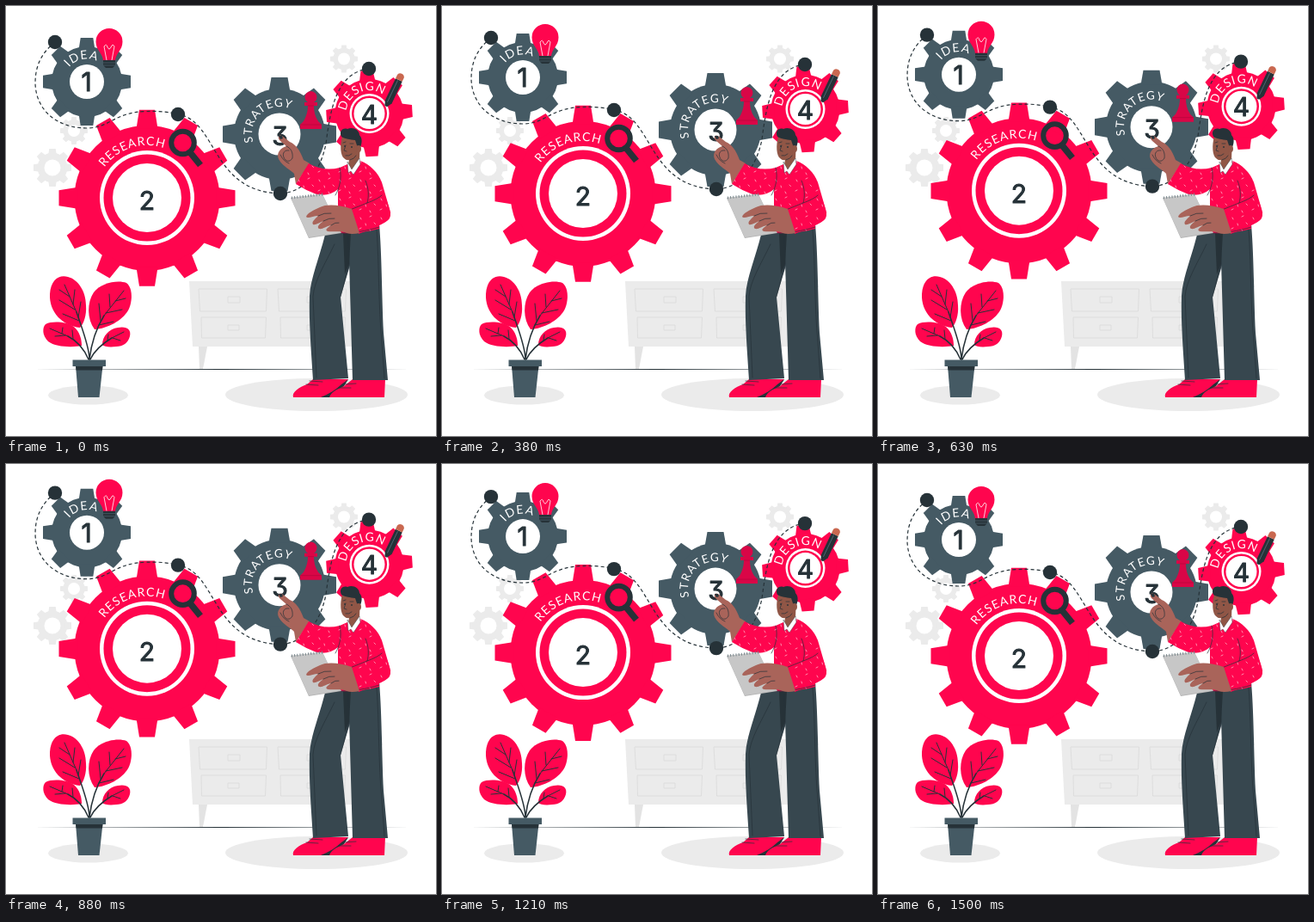
An HTML page that plays this animation: 500x500 px, repeating every 1540 ms.

```html
<!DOCTYPE html>
<html lang="en">
<head>
<meta charset="utf-8">
<title>Gears</title>
<style>
  html, body { margin: 0; width: 100%; height: 100%; overflow: hidden; background: #fff; }
  svg { display: block; width: 100vw; height: 100vh; }
  .red { fill: #ff054e; }
  .slate { fill: #455a64; }
  .dark { fill: #263238; }
  .pale { fill: #ebebeb; }
  .white { fill: #fff; }
  .face { fill: #905646; }
  .hand { fill: #a9645a; }
  .pants { fill: #37474f; }
  .line { fill: none; stroke: #263238; stroke-width: .7; stroke-linecap: round; stroke-linejoin: round; }
  .stem { stroke-width: 1.5; }
  .vein { stroke-width: 1; }
  .route { stroke-width: 1.2; stroke-dasharray: 4 3; stroke-linecap: butt; }
  .label { font: 400 14px Lato, "Open Sans", sans-serif; letter-spacing: 1px; fill: #fff; text-anchor: middle; }
  .digit {
    font: 400 30px Inter, Roboto, sans-serif; font-feature-settings: "cv09";
    fill: #263238; stroke: #263238; stroke-width: 1; stroke-linejoin: round; text-anchor: middle;
  }
</style>
</head>
<body>
<svg viewBox="0 0 500 500">
  <defs>
    <pattern id="flecks" width="24" height="22" patternUnits="userSpaceOnUse">
      <path d="M4 4l1 2M15 3l2-1M10 11l.5 2M20 10l1.500 1.500M3 17l2-1M15 18l1 2"
        fill="none" stroke="#ffb3c8" stroke-width=".8" stroke-linecap="round"/>
    </pattern>
  </defs>

  <!-- room -->
  <path class="dark" d="M32 422.400L250 422L469 422.400L250 422.900Z"/>
  <path d="M224 396H234L229 422H225Z" fill="#e3e3e3"/>
  <path class="pale" d="M213 320H424L420 396H217Z"/>
  <g id="drawers" fill="none" stroke="#dcdcdc" stroke-width=".9"></g>
  <ellipse class="pale" cx="95.500" cy="452.500" rx="46.500" ry="11"/>
  <ellipse class="pale" cx="361" cy="452" rx="106" ry="19"/>
  <g id="backGears"></g>

  <!-- plant -->
  <g class="red">
    <path d="M86 374C66 372 50 356 51 335C52 318 62 312 72 315C84 318 93 332 93 348C94 360 90 370 86 374Z"/>
    <path d="M103 376C94 364 94 345 102 333C110 322 130 318 140 322C148 328 147 345 142 354C135 366 118 375 103 376Z"/>
    <path d="M88 395C78 397 58 397 49 390C42 383 42 374 46 370C54 366 70 367 79 373C86 379 88 388 88 395Z"/>
    <path d="M112 394C112 384 120 375 130 374C140 372 146 376 144 384C142 392 136 396 128 396C120 397 114 396 112 394Z"/>
  </g>
  <path class="line stem" d="M97 411C97 396 88 374 82 356M97 411C99 394 104 376 114 360
    M96 411C90 397 82 389 72 384M98 411C103 400 113 392 123 386"/>
  <path class="line vein" d="M82 356L68 324M78 347L80 330M80 353L62 342M84 362L87 344M85 366L66 358M74 338L62 330
    M114 360L137 331M121 350L120 335M116 357L135 353M110 366L108 346M108 371L125 367M127 343L139 340
    M72 384L51 375M65 381L66 374M69 383L57 384M78 387L77 377M123 386L137 379M118 389L119 382M124 386L133 389"/>
  <path class="slate" d="M81 418H112.500L108.500 455H84Z"/>
  <path class="dark" d="M81 418H112.500L112 423.500H81.600Z"/>
  <path class="slate" d="M77.500 411.500H116V419H77.500Z"/>

  <!-- floating group -->
  <g id="float">
    <g id="gears"></g>
    <path class="line route"
      d="M57 42C38 57 34 74 34 90C35 122 60 142 94 142C121 142 126 123 164 122.500C176 122 190 123 200 126
         C246 133 238 216 319 218C348 217 366 191 372 160C376 130 380 106 393 89C401 79 411 74 422 73"/>
    <g id="dots" class="dark"></g>

    <!-- bulb -->
    <path class="red" d="M113 64C113 55 104.500 52 104.500 41.500A15.500 15.500 0 0 1 135.500 41.500C135.500 52 127 55 127 64Z"/>
    <path d="M117 63L114 47Q117 43 118 48Q120 52 122 48Q124 43 126 47L123 63" fill="none" stroke="#fff" stroke-width=".8"/>
    <path class="dark" d="M113 63H127V69L124 72H116L113 69Z"/>
    <path d="M113 66H127M113 69H127" stroke="#546e7a" stroke-width=".6"/>

    <!-- magnifier -->
    <g fill="none" stroke="#263238">
      <circle cx="205.500" cy="159" r="13.300" stroke-width="6"/>
      <path d="M213 169L226 185" stroke-width="7.500"/>
    </g>

    <!-- pawn -->
    <path fill="#d90647" d="M342 143V138L346 134C350 127 351 121 351 116H347V112H351A7 7 0 1 1 358 112H362V116H358
      C358 122 359 128 363 134L367 138V143Z"/>
    <path d="M351 116H358M342 138H367" stroke="#b3073c" stroke-width=".7"/>

    <!-- pencil -->
    <g transform="translate(459 81.500) rotate(25.500)">
      <path class="dark" d="M-4.300 5H4.300V33L1 39H-2L-4.300 33Z"/>
      <path d="M-1 6V34" stroke="#546e7a" stroke-width=".8"/>
      <path fill="#c96850" d="M-4.300 5V0Q-3 -3 0 -3Q3 -3 4.300 0V5Z"/>
    </g>
  </g>

  <!-- shoes and legs -->
  <path class="red" d="M357 434H398C390 444 385 455 377 455H334C332 449 341 443 350 440Z"/>
  <path class="red" d="M403 434H441L440 455H375C374 449 383 446 393 442Z"/>
  <path class="dark" d="M366 455C376 451 384 446 390 440L398 434L393 442C384 446 378 449 376 455Z"/>
  <path class="line" d="M353 436L368 437M349 440L363 441M391 440L407 439M387 444L401 444"/>
  <path class="pants" d="M386 262L371 266C364 294 354 317 353 337C352 367 355 402 357 435L398 433L389 338L402 295L399 260Z"/>
  <path class="pants" d="M395 260L434 254C437 288 437 337 439 380L444 435H403L399 296Z"/>
  <path class="dark" d="M392 264L401 263L399 300L394 312Z"/>
  <path class="line" d="M398 268L399 300L389 338M431 260C434 300 433 350 437 390L440 433M382 277C371 300 358 320 357 338L361 432"/>

  <!-- raised hand -->
  <path class="hand" d="M353 183L346 179C342 168 337 161 330 158L321 151C317 149 315 153 319 157L326 163
    C319 165 314 171 317 178C322 187 332 191 335 195L337 207Z"/>
  <path class="line" d="M326 163C331 165 334 170 333 177C330 182 325 181 323 176C321 171 324 167 329 168M319 173Q322 180 329 183"/>
  <path class="dark" d="M317 151L321 151L322 154L319 155Z"/>

  <!-- sweater -->
  <g id="sweater"></g>
  <path class="line" d="M388 188C391 200 388 211 383 220M418 203C422 212 422 222 420 229L400 237M420 229C428 226 434 223 437 220M386 264C402 264 419 262 434 257"/>

  <!-- head -->
  <path class="face" d="M391 152C388 162 389 174 393 177Q396 180 399 179L398 184L402 192L411 179L412 153Z"/>
  <path class="dark" d="M390 152C387 146 391 141 397 143C403 140 411 144 411 150C415 154 414 161 411 166L408 162L406 156C400 155 395 155 390 152Z"/>
  <ellipse class="face" cx="410" cy="166" rx="3" ry="4"/>
  <path class="line" d="M392 159L395 158M400 160L404 160M395 162L393 168L396 169M395 174Q399 175 402 172M400 179Q405 178 407 174"/>
  <circle class="dark" cx="394" cy="163" r=".9"/>
  <circle class="dark" cx="402" cy="164" r=".9"/>
  <path class="white" d="M397 181L402 190L411 177L412 184L404 196L401 192L398 194Z" stroke="#263238" stroke-width=".4"/>

  <!-- notepad and holding hand -->
  <path d="M331 223L368 219L390 264L352 270Z" fill="#b5b5b5"/>
  <path d="M331 223L368 219L389 263.500L352 269Z" fill="#c7c7c7"/>
  <path d="M332 223L368 219" stroke="#78868c" stroke-width="3" stroke-dasharray="1 2.200"/>
  <path class="hand" d="M402 236C388 231 373 230 365 234C358 237 350 241 349 245C351 248 357 244 363 244
    C359 248 355 251 357 254C360 255 364 252 369 250C364 254 361 257 364 259C368 260 372 256 378 255
    C374 258 370 260 374 262C380 263 390 261 396 264Q402 266 411 264Z"/>
  <path class="line" d="M363 244Q370 240 378 241M369 250Q376 246 382 247M378 255Q383 251 387 252"/>
</svg>

<script>
const SVG_NS = "http://www.w3.org/2000/svg";
const byId = id => document.getElementById(id);

function add(parent, tag, attrs, text) {
  const node = document.createElementNS(SVG_NS, tag);
  for (const name in attrs) node.setAttribute(name, attrs[name]);
  if (text) node.textContent = text;
  return parent.appendChild(node);
}

const disc = (parent, x, y, r, cls) => add(parent, "circle", { cx: x, cy: y, r, class: cls });

function gear(parent, { x, y, outer, body, teeth = 8, tip, base, turn = 0, cls }) {
  const g = add(parent, "g", { class: cls, transform: `translate(${x} ${y}) rotate(${turn})` });
  disc(g, 0, 0, body, cls);
  const root = body - 4;
  for (let i = 0; i < teeth; i++) {
    add(g, "path", {
      d: `M${-base} ${-root}L${-tip} ${-outer}H${tip}L${base} ${-root}Z`,
      transform: `rotate(${i * 360 / teeth})`
    });
  }
}

// Text on a half circle whose middle lies at the given angle in degrees.
function arcText(parent, text, x, y, r, angle, size) {
  const point = deg => {
    const a = deg * Math.PI / 180;
    return `${x + r * Math.cos(a)} ${y + r * Math.sin(a)}`;
  };
  const id = "arc" + text;
  add(parent, "path", {
    id, fill: "none",
    d: `M${point(angle - 90)}A${r} ${r} 0 0 1 ${point(angle + 90)}`
  });
  const label = add(parent, "text", { class: "label", style: `font-size:${size}px` });
  add(label, "textPath", { href: "#" + id, startOffset: "50%" }, text);
}

const digit = (parent, n, x, y) => add(parent, "text", { class: "digit", x, y: y + 11 }, n);

for (const [x, y, size, hole] of [[54, 188, 22, 9.5], [79, 145, 16, 7], [393, 61.5, 16, 7]]) {
  gear(byId("backGears"), {
    x, y, outer: size, body: size * .79, tip: size * .17, base: size * .23, cls: "pale"
  });
  disc(byId("backGears"), x, y, hole, "white");
}

const gears = byId("gears");
gear(gears, { x: 94, y: 88, outer: 51, body: 41, tip: 7.3, base: 9.5, cls: "slate" });
disc(gears, 94, 88, 20, "white");
arcText(gears, "IDEA", 94, 88, 26.5, -102, 14);
digit(gears, 1, 93.5, 88);

gear(gears, { x: 164, y: 223.3, outer: 102.5, body: 84.5, teeth: 12, tip: 9, base: 12.5, cls: "red" });
[[55, "white"], [50.5, "red"], [40, "white"]].forEach(([r, cls]) => disc(gears, 164, 223, r, cls));
arcText(gears, "RESEARCH", 164, 223, 61, -107.5, 14);
digit(gears, 2, 164, 226);

gear(gears, { x: 318, y: 149, outer: 66, body: 53, tip: 9.5, base: 12.5, cls: "slate" });
disc(gears, 318, 149, 24.5, "white");
arcText(gears, "STRATEGY", 318, 149, 32, -131, 13.5);
digit(gears, 3, 318.5, 151);

gear(gears, { x: 422.5, y: 125, outer: 50, body: 40, tip: 7, base: 9.5, turn: -3.5, cls: "red" });
[[23, "white"], [20.5, "red"], [18, "white"]].forEach(([r, cls]) => disc(gears, 422.5, 125, r, cls));
arcText(gears, "DESIGN", 422.5, 125, 27, -113, 14);
digit(gears, 4, 422.5, 125.5);

for (const [x, y] of [[57, 42], [200, 126], [319, 218], [422, 73]]) disc(byId("dots"), x, y, 8.2, "dark");

for (const x of [224, 316]) {
  add(byId("drawers"), "path", {
    d: `M${x} 329h79.500l-1 26h-77ZM${x + 3} 362h75.500l-1 24h-74ZM${x + 34} 338h14v7h-14ZM${x + 34} 371h13v6h-13Z`
  });
}

const sweaterParts = [
  "M352 183C364 190 376 191 388 188L397 184L403 195L412 180C423 184 433 194 437 205L446 236Q450 245 441 251L434 254V259Q414 265 386 264L386 213C379 219 371 221 361 219Q348 214 337 207Z",
  "M420 229L400 237L410 265C425 259 442 253 446 247C449 241 444 231 441 222Z"
];
for (const d of sweaterParts) {
  add(byId("sweater"), "path", { d, class: "red" });
  add(byId("sweater"), "path", { d, fill: "url(#flecks)" });
}

const LOOP = 1540, FLOAT = 1500, RISE = 10, STEP = 1000 / 24;
const floating = byId("float");

function draw(now) {
  const time = Math.floor((now % LOOP + 4) / STEP) * STEP;
  const phase = Math.min(time / FLOAT, 1);
  const lift = RISE * (1 - Math.abs(1 - 2 * phase));
  floating.setAttribute("transform", `translate(0 ${-lift})`);
}

const start = performance.now();
function tick() {
  draw(performance.now() - start);
  requestAnimationFrame(tick);
}
tick();
</script>
</body>
</html>
```
